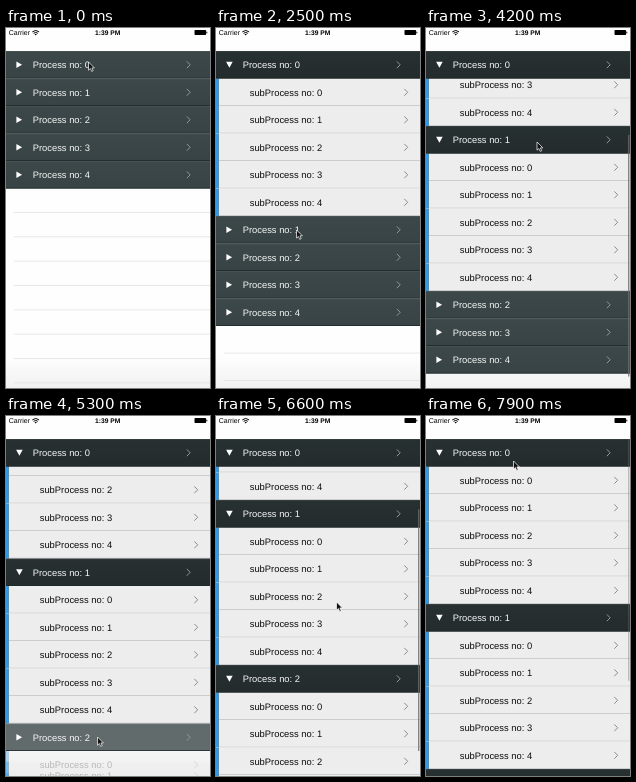
These frames come from a looping animation (204 px wide and 360 px high, 8000 ms). An HTML page:

```html
<!DOCTYPE html>
<html lang="en">
<head>
<meta charset="utf-8">
<title>Process list</title>
<style>
  html, body { margin: 0; width: 100%; height: 100%; overflow: hidden; background: #fff; }
  svg {
    display: block; width: 204px; height: 360px;
    font-family: "Liberation Sans", Arial, sans-serif; text-rendering: geometricPrecision;
  }
</style>
</head>
<body>
<svg viewBox="0 0 204 360">
  <defs>
    <clipPath id="view"><rect y="23" width="204" height="337"/></clipPath>
    <linearGradient id="closed" x2="0" y2="1">
      <stop stop-color="#3c4849"/><stop offset="1" stop-color="#374344"/>
    </linearGradient>
    <linearGradient id="open" x2="0" y2="1">
      <stop stop-color="#283132"/><stop offset="1" stop-color="#232b2c"/>
    </linearGradient>
    <linearGradient id="shade" x2="0" y2="1">
      <stop stop-color="#fefefe"/><stop offset="1" stop-color="#f1f1f1"/>
    </linearGradient>
  </defs>
  <rect width="204" height="360" fill="#fefefe"/>
  <rect y="328" width="204" height="32" fill="url(#shade)"/>
  <g clip-path="url(#view)">
    <g id="blank" stroke="#dedede" stroke-width=".7"></g>
    <g id="subs"></g>
    <g id="heads"></g>
    <rect id="thumb" x="202" width="1.4" height="242" rx=".7" fill="#6c6c6c" fill-opacity=".8"/>
  </g>
  <text x="2.7" y="7.2" font-size="7">Carrier</text>
  <g fill="none" stroke="#000">
    <path d="M26.3 3.9Q29.7 .9 33.1 3.9"/>
    <path d="M27.6 5.3Q29.7 3.5 31.8 5.3"/>
  </g>
  <path d="M28.6 6.3Q29.7 5.4 30.8 6.3L29.7 7.5Z"/>
  <text x="101.7" y="7.2" font-size="6.7" font-weight="bold" text-anchor="middle">1:39 PM</text>
  <rect x="188.5" y="2" width="11.6" height="5" rx=".8"/>
  <rect x="200.4" y="3.5" width=".9" height="2" rx=".4"/>
  <path id="cursor" d="M0 0V8.2L1.9 6.5L3.2 9.4L4.7 8.7L3.4 5.9H5.9Z" fill="#111" stroke="#fff" stroke-width=".7"/>
</svg>
<script>
const LOOP = 8000, ROW = 27.5, TOP = 23, VIEW = 337, COUNT = 5;
const OPEN_MS = 400, OPEN_AT = [900, 2700, 5130];
const HOME = [82.5, 34];

// Pointer gestures; a drag carries the list along with the pointer.
const move = (from, to, x, y) => ({ from, to, x, y });
const drag = (from, to, x, y) => ({ from, to, x, y, drag: true });
const GESTURES = [
  move(1800, 2550, 80.5, 204),
  move(3150, 3600, 113, 204),
  drag(3650, 4200, 111, 114),
  drag(4450, 4800, 108, 158.5),
  move(4800, 5130, 91.5, 321),
  move(5400, 5700, 118, 235.5),
  drag(5700, 6100, 119.5, 165),
  move(6200, 6400, 120, 174),
  drag(6400, 7100, 122.5, 234),
  drag(7100, 7550, 118, 290),
  move(7550, 7900, 87.5, 45)
];

const $ = id => document.getElementById(id);
const clamp = x => Math.max(0, Math.min(1, x));
const ease = x => x * x * (3 - 2 * x);
const mix = (a, b, k) => a + (b - a) * k;
const range = n => [...Array(n).keys()];

function pose(t) {
  let [x, y] = HOME, scroll = 0, thumb = 0;
  for (const g of GESTURES) {
    if (t < g.from) break;
    const k = ease(clamp((t - g.from) / (g.to - g.from)));
    const dy = (g.y - y) * k;
    x = mix(x, g.x, k);
    y += dy;
    if (g.drag) {
      scroll -= dy;
      thumb = 1 - clamp((t - g.to - 250) / 200);
    }
  }
  return { x, y, scroll, thumb };
}

function add(parent, tag, attrs, text) {
  const el = document.createElementNS("http://www.w3.org/2000/svg", tag);
  for (const name in attrs) el.setAttribute(name, attrs[name]);
  if (text) el.textContent = text;
  return parent.appendChild(el);
}

function place(el, x, y) {
  el.setAttribute("transform", `translate(${x.toFixed(2)} ${y.toFixed(2)})`);
}

function label(parent, x, fill, text) {
  add(parent, "text", { x, y: 17.1, "font-size": 9.4, fill }, text);
}

function chevron(parent, x, color) {
  add(parent, "path", { d: `M${x} 10.4l3.4 3.4l-3.4 3.4`, fill: "none", stroke: color });
}

function makeHead(i) {
  const g = add($("heads"), "g", {});
  const bg = add(g, "rect", { width: 204, height: ROW });
  add(g, "rect", { width: 204, height: .8, fill: "#fff", "fill-opacity": .07 });
  add(g, "rect", { y: ROW - .8, width: 204, height: .8, fill: "#202829" });
  const mark = add(g, "path", { fill: "#fff" });
  label(g, 26.7, "#f7f7f7", "Process no: " + i);
  chevron(g, 180.8, "#919a9b");
  return { g, bg, mark };
}

function makeSub(i) {
  const g = add($("subs"), "g", {});
  add(g, "rect", { width: 204, height: ROW, fill: "#ededed" });
  add(g, "rect", { y: ROW - .8, width: 204, height: .8, fill: "#c6c6c6" });
  add(g, "rect", { width: 3, height: ROW, fill: "#2c9bea" });
  label(g, 33.7, "#0c0c0c", "subProcess no: " + i);
  chevron(g, 188.3, "#8b8b8b");
  return g;
}

const heads = range(COUNT).map(makeHead);
const subs = OPEN_AT.map(() => range(COUNT).map(makeSub));
const lines = range(9).map(() => add($("blank"), "line", { x1: 8, x2: 204 }));

function draw(t) {
  const { x, y: py, scroll, thumb } = pose(t);
  let y = TOP - scroll, opened = 0;

  heads.forEach((head, i) => {
    const raw = clamp((t - OPEN_AT[i]) / OPEN_MS) || 0;
    const k = ease(raw), done = raw === 1;
    const fill = done ? "url(#open)" : raw > 0 ? "#626b6c" : "url(#closed)";
    place(head.g, 0, i ? y : Math.max(TOP, y));
    head.bg.setAttribute("fill", fill);
    head.mark.setAttribute("d", done ? "M10.1 10.8h6.6l-3.3 5.9z" : "M10.4 10.5v6.4l5.7-3.2z");
    y += ROW;
    if (subs[i]) subs[i].forEach((row, n) => {
      place(row, 0, y + n * ROW * k);
      row.setAttribute("opacity", k);
    });
    y += COUNT * ROW * k;
    opened += k;
  });

  const gap = mix(24.35, ROW, clamp(opened));
  lines.forEach((line, i) => place(line, 0, y + (i + 1) * gap - .4));

  const content = COUNT * ROW * (1 + opened);
  $("thumb").setAttribute("y", TOP + scroll * VIEW / (content - 50));
  $("thumb").setAttribute("opacity", thumb);
  place($("cursor"), x, py);
}

const start = performance.now();
function tick() {
  draw((performance.now() - start) % LOOP);
  requestAnimationFrame(tick);
}
tick();
</script>
</body>
</html>
```
